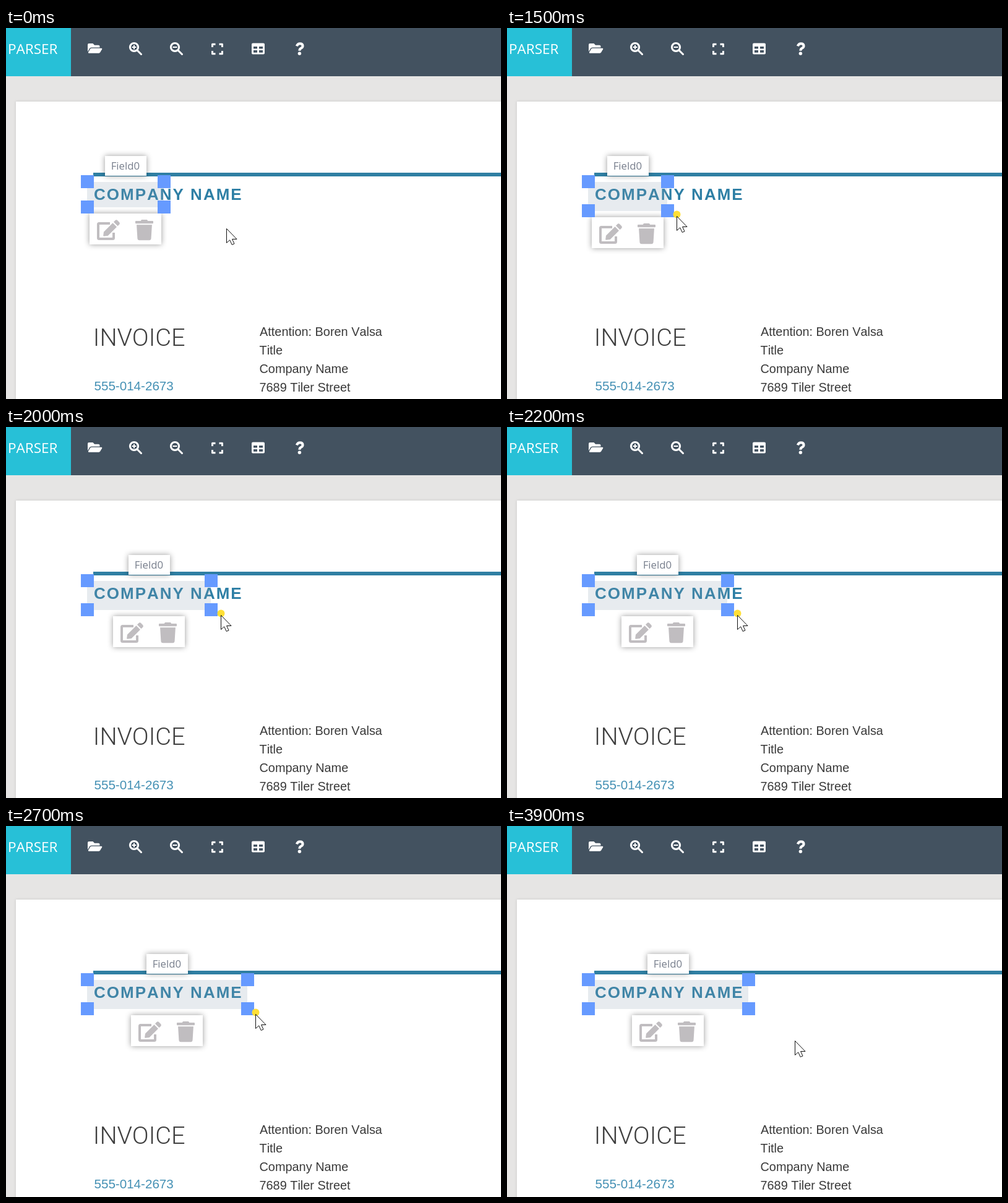
An HTML page that plays this animation: 800x600 px, repeating every 4500 ms.

```html
<!DOCTYPE html>
<html lang="en">
<head>
<meta charset="utf-8">
<title>Field resize</title>
<style>
  html, body { margin: 0; width: 100%; height: 100%; overflow: hidden; background: #e6e5e4; }
  svg { display: block; width: 800px; height: 600px; }
  text { font-kerning: none; }
  .ui { font-family: "Open Sans", "Noto Sans", sans-serif; }
  .doc { font: 19.9px "Liberation Sans", Arial, sans-serif; fill: #3a3a3a; }
  .blue { fill: #4490b4; font-size: 20.6px; }
  .company { font-size: 26px; font-weight: 700; letter-spacing: 2px; fill: #2e7fa5; }
  .heading { font: 300 39.7px Roboto, "Open Sans", sans-serif; fill: #3f3f3f; }
  .icons { fill: #fff; stroke: #fff; stroke-width: 0; }
  .line { fill: none; stroke-width: 3; }
  .card { fill: #fff; filter: drop-shadow(0 0 5px rgba(0, 0, 0, .4)); }
  .tool { fill: #c0bdc0; }
  .handles { fill: #669aff; }
</style>
</head>
<body>
<svg viewBox="0 0 800 600">
  <defs>
    <g id="lens">
      <circle class="line" cx="8" cy="8" r="6.6"/>
      <path class="line" d="M13 13L19.5 19.5" stroke-width="4" stroke-linecap="round"/>
      <path class="line" d="M4.5 8h7" style="stroke-width:2"/>
    </g>
    <rect id="handle" width="21" height="21"/>
  </defs>

  <rect width="800" height="600" fill="#e6e5e4"/>
  <rect x="16" y="119" width="800" height="500" fill="#fff" style="filter:drop-shadow(0 0 2px rgba(0,0,0,.12))"/>

  <rect width="800" height="78" fill="#435260"/>
  <rect width="105" height="78" fill="#27c0d7"/>
  <text class="ui" x="3" y="42" font-size="22.5" fill="#fff">PARSER</text>

  <g class="icons">
    <path transform="translate(132 22.5) scale(.0405)" d="M573 292L500 416A64 64 0 0 1 445 448H45C26 448 15 428 24 412L97 288A64 64 0 0 1 152 256H552C570 256 582 276 573 292ZM152 224H480V176A48 48 0 0 0 432 128H272L208 64H48A48 48 0 0 0 0 112V390L69 272C86 242 118 224 152 224Z"/>
    <use href="#lens" x="199" y="23"/>
    <path class="line" d="M207 27.5v7" style="stroke-width:2"/>
    <use href="#lens" x="265" y="23"/>
    <path class="line" d="M333.5 31v-4.7h5M344.5 26.3h5V31M349.5 37v4.7h-5M338.5 41.7h-5V37" stroke-linejoin="round"/>
    <path fill-rule="evenodd" d="M399 24.5h17a2 2 0 0 1 2 2v14a2 2 0 0 1-2 2h-17a2 2 0 0 1-2-2v-14a2 2 0 0 1 2-2zM400 30v3.5h6V30zM409 30v3.5h6V30zM400 36v3.7h6V36zM409 36v3.7h6V36z"/>
    <path class="line" d="M469.8 29.2Q471.4 25.2 475 25.2Q479.6 25.2 479.6 29Q479.6 31.4 476.8 32.8Q474.4 34 474.4 36.8" style="stroke-width:4"/>
    <circle cx="474.4" cy="41.3" r="2.7"/>
  </g>

  <rect x="141" y="234" width="659" height="6" fill="#2f7fa3"/>
  <g class="doc">
    <text class="company" x="142" y="278">COMPANY NAME</text>
    <text class="heading" x="140.8" y="514">INVOICE</text>
    <text class="blue" x="142.5" y="586">555-014-2673</text>
    <text class="blue" x="142.5" y="614.5">our_mail@us.test</text>
    <text x="410" y="498">Attention: Boren Valsa</text>
    <text x="409.5" y="528">Title</text>
    <text x="409.5" y="558">Company Name</text>
    <text x="409.5" y="588">7689 Tiler Street</text>
  </g>

  <rect id="area" x="131" y="249" fill="rgba(135,155,175,.2)"/>
  <g id="label">
    <rect class="card" x="160" y="207" width="67" height="32"/>
    <text class="ui" x="169.7" y="229" font-size="16.8" fill="#777e8c">Field0</text>
  </g>
  <g id="tools">
    <rect class="card" x="135" y="300" width="116" height="50"/>
    <g class="tool">
      <path d="M168 316H150.5a1.5 1.5 0 0 0-1.5 1.5V339.5a1.5 1.5 0 0 0 1.5 1.5H172.5a1.5 1.5 0 0 0 1.5-1.5V331" fill="none" stroke="#c0bdc0" stroke-width="4"/>
      <path d="M172.5 315.2L179 321.7L164.7 336L158.2 336.8Q157.1 336.8 157.2 335.7L158 329.7ZM174 313.7L176.6 311.1Q178.3 309.6 180 311.1L183.2 314.3Q184.7 316 183.2 317.7L180.5 320.3Z"/>
      <path transform="translate(209 310) scale(.0647)" d="M432 32H312L303 13A24 24 0 0 0 281 0H167A24 24 0 0 0 145 13L136 32H16A16 16 0 0 0 0 48V80A16 16 0 0 0 16 96H432A16 16 0 0 0 448 80V48A16 16 0 0 0 432 32ZM32 128L53 467A48 48 0 0 0 101 512H347A48 48 0 0 0 395 467L416 128Z"/>
    </g>
  </g>
  <g class="handles">
    <use href="#handle" x="121" y="238"/>
    <use href="#handle" id="topRight" y="238"/>
    <use href="#handle" id="bottomLeft" x="121"/>
    <use href="#handle" id="bottomRight"/>
  </g>

  <g id="cursor">
    <circle id="press" cx=".5" cy="-2.5" r="6" fill="#ffdf36"/>
    <path d="M.5 .5V23.5L5.7 18.9L9.2 26.5L13 24.9L9.6 17.5H17Z" fill="#fff" stroke="#111"/>
  </g>
</svg>
<script>
  const LOOP = 4500, STEP = 100;
  const el = id => document.getElementById(id);
  const set = (id, attrs) => {
    for (const name in attrs) el(id).setAttribute(name, attrs[name]);
  };

  // Each track starts at a time and holds one value per step.
  const approach = { start: 400, pts: [[356, 324], [343, 319], [320, 312], [299, 305], [282, 300], [271, 297], [266, 296]] };
  const drag = { start: 1400, pts: [267, 274, 290, 305, 320, 334, 347, 360, 372, 382, 391, 398, 402, 403] };
  const edge = { start: 1400, pts: [245, 249, 262, 278, 293, 307, 321, 334, 346, 356, 365, 372, 377, 380] };
  const leave = { start: 3200, pts: [[403, 304], [405, 305], [409, 307], [417, 312], [430, 320], [445, 330], [457, 341], [465, 347]] };

  const at = ({ start, pts }, t) => {
    const i = Math.floor((t - start) / STEP);
    return pts[Math.max(0, Math.min(pts.length - 1, i))];
  };

  function cursorAt(t) {
    if (t < 1100) return at(approach, t);
    return t < leave.start ? [at(drag, t), 304] : at(leave, t);
  }

  function render(t) {
    const right = at(edge, t);
    const grow = t < 1100 ? 0 : 6;
    const shift = Math.floor((right - 245) / 2);
    const bottom = 279 + grow;

    set('area', { width: right + 10 - 131, height: bottom + 11 - 249 });
    set('label', { transform: `translate(${shift} 0)` });
    set('tools', { transform: `translate(${shift} ${grow})` });
    set('topRight', { x: right });
    set('bottomLeft', { y: bottom });
    set('bottomRight', { x: right, y: bottom });

    set('cursor', { transform: `translate(${cursorAt(t).join(' ')})` });
    set('press', { visibility: t >= 1100 && t < leave.start ? 'visible' : 'hidden' });
  }

  const origin = performance.now();
  function tick() {
    render((performance.now() - origin) % LOOP);
    requestAnimationFrame(tick);
  }
  tick();
</script>
</body>
</html>
```
